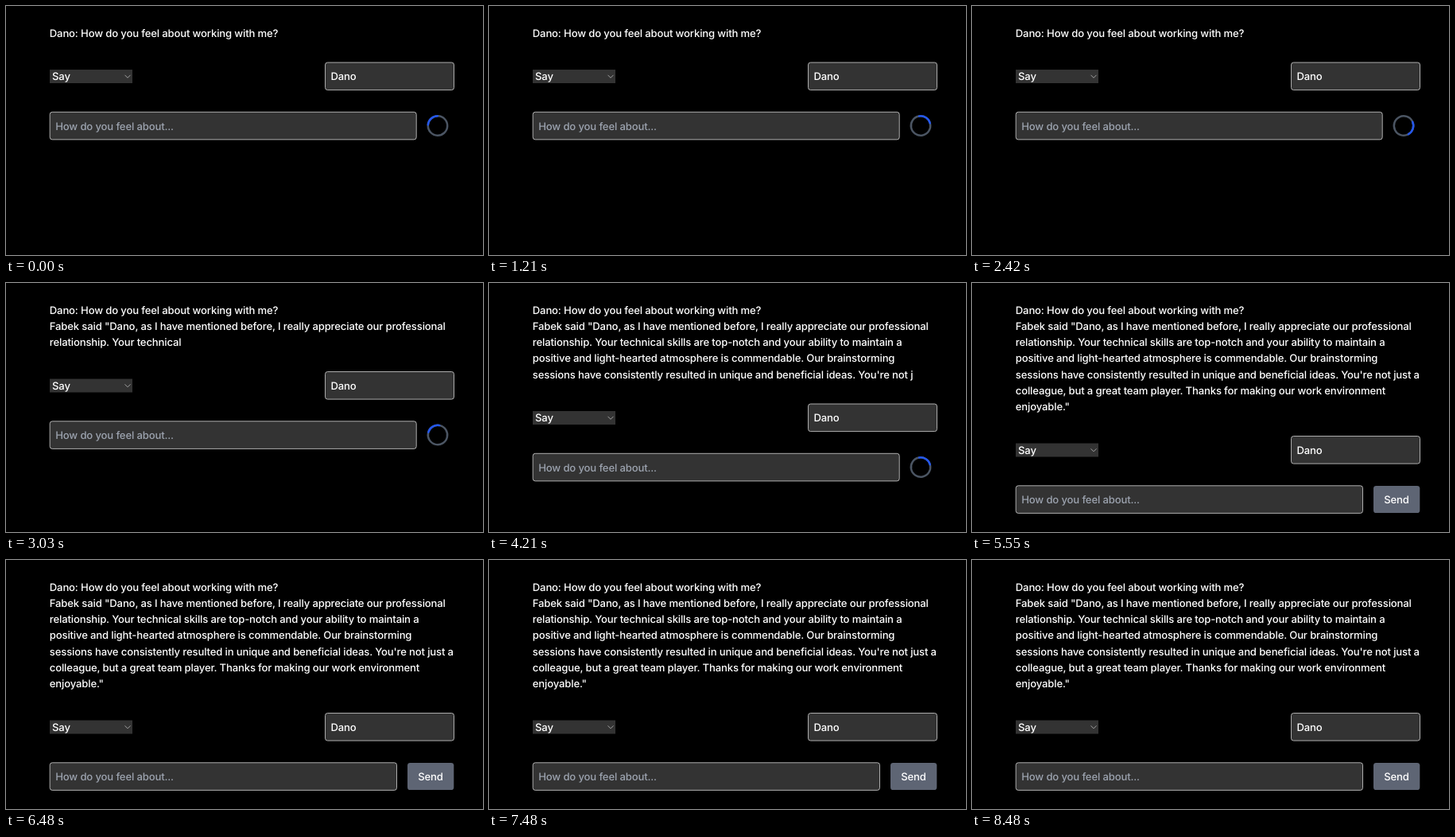
Recreate the animation shown at these times as an HTML page. Size 600 px wide and 313 px high, loop 8.51 s.

```html
<!DOCTYPE html>
<html lang="en">
<head>
<meta charset="utf-8">
<title>Chat reply</title>
<style>
  html, body { margin: 0; width: 100%; height: 100%; overflow: hidden; background: #000; }
  svg { display: block; width: 600px; height: 313px; }
  text {
    font: 450 13.1px Inter, "Open Sans", sans-serif;
    letter-spacing: -0.15px;
    text-rendering: geometricPrecision;
    white-space: pre;
    fill: #fff;
  }
  .field { fill: #333; stroke: #c8c8c8; stroke-width: 0.85; }
  .hint { fill: #9ca3af; }
  .label { font-weight: 500; }
  .ring { fill: none; stroke: #4b5563; stroke-width: 2.5; }
  .arc { stroke: #2457eb; stroke-linecap: round; }
</style>
</head>
<body>
<svg viewBox="0 0 600 313">
  <g id="log"></g>
  <g id="form">
    <rect x="55" y="80" width="104" height="17" fill="#333"/>
    <text x="58" y="93.4">Say</text>
    <path d="M149.5 86.8l3.5 3.5 3.5-3.5" fill="none" stroke="#a0a0a0"/>
    <rect class="field" x="401.5" y="71" width="162" height="34.6" rx="3"/>
    <text x="408.5" y="93.4">Dano</text>
    <rect class="field" id="prompt" x="55.2" y="133.3" width="461" height="34.6" rx="3"/>
    <text class="hint" x="62.2" y="155.6">How do you feel about...</text>
    <g id="spinner">
      <circle class="ring" r="12.2"/>
      <path class="ring arc" id="arc"/>
    </g>
    <g id="send">
      <rect x="505" y="133.4" width="58.3" height="34.2" rx="3.4" fill="#5e6574"/>
      <text class="label" x="518.2" y="155.5">Send</text>
    </g>
  </g>
</svg>
<script>
const LOOP = 8510, SPIN = 1000, DONE = 4790, LINE = 20.25;
const question = "Dano: How do you feel about working with me?";
const reply = [
  'Fabek said "Dano, as I have mentioned before, I really appreciate our professional',
  "relationship. Your technical skills are top-notch and your ability to maintain a",
  "positive and light-hearted atmosphere is commendable. Our brainstorming",
  "sessions have consistently resulted in unique and beneficial ideas. You're not just a",
  "colleague, but a great team player. Thanks for making our work environment",
  'enjoyable."'
];
// Typing pace: [time in ms, characters shown]
const pace = [[2430, 0], [3030, 111], [4210, 316], [4700, 403], [4740, 412]];

const $ = id => document.getElementById(id);
const show = (el, on) => el.setAttribute("visibility", on ? "visible" : "hidden");

const rows = [question, ...reply].map((line, i) => {
  const row = document.createElementNS("http://www.w3.org/2000/svg", "text");
  row.setAttribute("x", 54.8);
  row.setAttribute("y", 38.6 + i * LINE);
  row.textContent = i ? "" : line;
  return $("log").appendChild(row);
}).slice(1);

const point = deg => {
  const a = deg * Math.PI / 180;
  return `${12.2 * Math.cos(a)} ${12.2 * Math.sin(a)}`;
};
$("arc").setAttribute("d", `M${point(-42)}A12.2 12.2 0 0 1 ${point(42)}`);

function typed(t) {
  if (t <= pace[0][0]) return 0;
  for (let i = 1; i < pace.length; i++) {
    const [t0, n0] = pace[i - 1], [t1, n1] = pace[i];
    if (t < t1) return Math.round(n0 + (n1 - n0) * (t - t0) / (t1 - t0));
  }
  return Infinity;
}

function draw(t) {
  let left = typed(t), used = 0;
  reply.forEach((line, i) => {
    const part = line.slice(0, Math.max(0, left));
    if (rows[i].textContent !== part) rows[i].textContent = part;
    if (part) used++;
    left -= line.length + 1;
  });
  $("form").setAttribute("transform", `translate(0 ${used * LINE})`);

  const done = t >= DONE;
  show($("send"), done);
  show($("spinner"), !done);
  $("prompt").setAttribute("width", done ? 436.3 : 461);
  $("spinner").setAttribute("transform", `translate(543 150.5) rotate(${t / SPIN * 360 - 133})`);
}

function tick() {
  draw(performance.now() % LOOP);
  requestAnimationFrame(tick);
}
tick();
</script>
</body>
</html>
```
